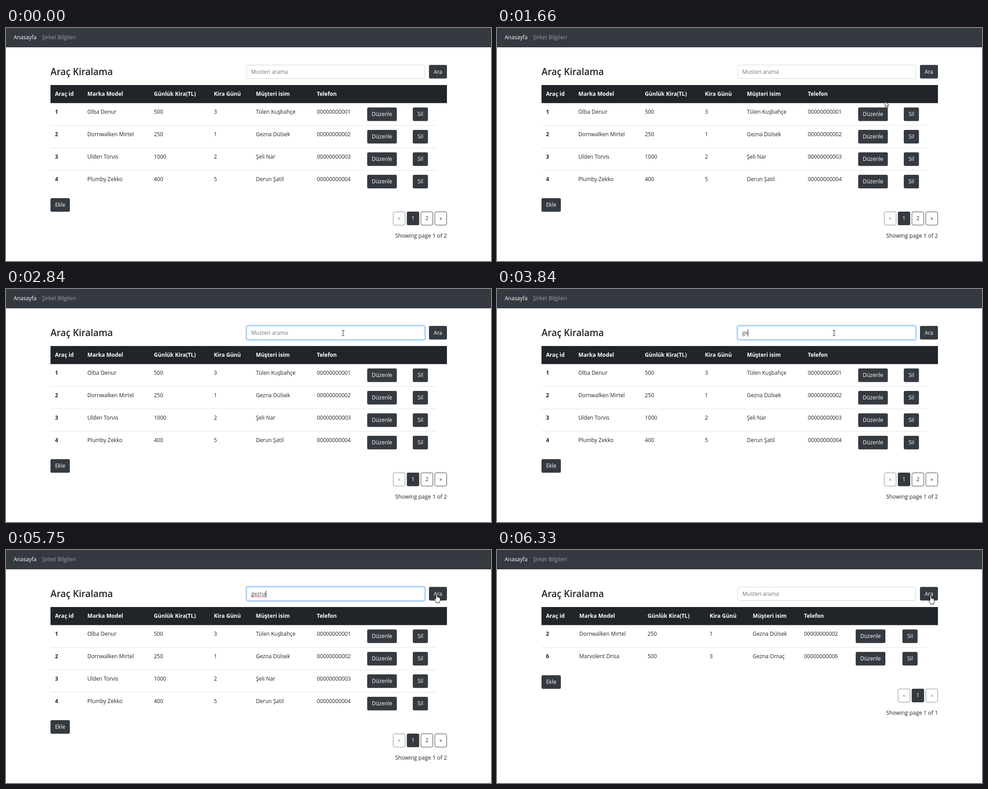
Animation of 1079x519 px, one loop 8 s. Source, as an HTML page:

```html
<!DOCTYPE html>
<html lang="tr">
<head>
<meta charset="utf-8">
<title>Araç Kiralama</title>
<style>
  html, body { margin: 0; width: 100%; height: 100%; overflow: hidden; background: #fff; }
  svg { display: block; font: 12px "Open Sans", "Noto Sans", sans-serif; fill: #212529; }
  .bold { font-weight: 700; font-size: 12.1px; }
  .title { font-weight: 600; font-size: 20.7px; }
  .white { fill: #fff; }
  .mid { text-anchor: middle; }
  .end { text-anchor: end; font-size: 12.35px; }
</style>
</head>
<body>
<svg id="stage" width="1079" height="519" viewBox="0 0 1079 519"></svg>
<script>
const LOOP = 8000, DARK = '#343a40';
const FOCUS = 2345, CLICK = 6050, RESULT = 6330, FADE = 150;
const QUERY = 'gezna', KEY_TIMES = [3460, 3840, 4160, 4420, 4620];
const HEADERS = ['Araç id', 'Marka Model', 'Günlük Kira(TL)', 'Kira Günü', 'Müşteri isim', 'Telefon'];

const allCars = {
  columns: [109, 181, 329, 462.5, 556, 691.5], edit: 803.5, remove: 905, pages: ['«', '1', '2', '»'],
  rows: [
    ['1', 'Olba Denur', '500', '3', 'Tülen Kuşbahçe', '00000000001'],
    ['2', 'Dornwalken Mirtel', '250', '1', 'Gezna Dülsek', '00000000002'],
    ['3', 'Ulden Torvis', '1000', '2', 'Şeli Nar', '00000000003'],
    ['4', 'Plumby Zekko', '400', '5', 'Derun Şatil', '00000000004'],
  ],
};
const foundCars = {
  columns: [109, 183, 335, 473, 569, 683], edit: 798, remove: 902, pages: ['«', '1', '»'],
  rows: [allCars.rows[1], ['6', 'Marvolent Drisa', '500', '3', 'Gezna Omaç', '00000000006']],
};

const text = (x, y, value, cls = '', attrs = '') => `<text x="${x}" y="${y}" class="${cls}" ${attrs}>${value}</text>`;
const box = (x, y, w, h, fill, attrs = '') => `<rect x="${x}" y="${y}" width="${w}" height="${h}" fill="${fill}" ${attrs}/>`;
const button = (x, y, w, label, id = '') =>
  box(x, y, w, 30.3, DARK, `rx="3" ${id}`) + text(x + w / 2, y + 19.3, label, 'white mid');

function pager(pages, y) {
  return pages.map((label, i) => {
    const x = 953.5 - (pages.length - 1 - i) * 30.85;
    if (label === '1') return button(x, y, 27.5, label);
    const disabled = label === '«' || (label === '»' && pages.length === 3);
    return `<g opacity="${disabled ? 0.6 : 1}">` +
      box(x + .5, y + .5, 26.5, 29.5, '#fff', `rx="3" stroke="${DARK}"`) +
      text(x + 13.75, y + 19.3, label, 'mid', `style="fill:${DARK}"`) + '</g>';
  }).join('');
}

function table(id, { columns, edit, remove, rows, pages }) {
  const footer = 179 + rows.length * 50;
  const head = columns.map((x, i) => text(x, 151.3, HEADERS[i], 'bold white')).join('');
  const body = rows.map((cells, r) => {
    const y = 167 + r * 50;
    return (r ? box(99, y - .5, 858, 1, '#dee2e6') : '') +
      cells.map((cell, i) => text(columns[i], y + 24.3, cell, i ? '' : 'bold')).join('') +
      button(edit, y + 10, 66, 'Düzenle') + button(remove, y + 10, 33.7, 'Sil');
  }).join('');
  return `<g id="${id}">${head}${body}${button(99, footer, 43, 'Ekle')}${pager(pages, footer + 30)}` +
    text(981, footer + 88, `Showing page 1 of ${pages.length - 2}`, 'end') + '</g>';
}

const stage = document.getElementById('stage');
stage.innerHTML =
  box(0, 0, 1079, 43, DARK) + text(17, 25.3, 'Anasayfa', 'white') +
  text(80, 25.3, 'Şirket Bilgileri', '', 'style="fill:#999da0"') +
  text(99, 104.8, 'Araç Kiralama', 'title') +
  box(533.75, 80.75, 399.5, 33.5, 'none', 'id="inputGlow" rx="5" stroke="#007bff" stroke-width="2.5"') +
  box(535.5, 82.5, 396, 30, '#fff', 'rx="3" stroke="#ced4da"') +
  box(535.5, 82.5, 396, 30, 'none', 'id="inputBorder" rx="3" stroke="#80bdff"') +
  text(545.5, 102.3, '', '', 'id="field"') +
  '<path id="squiggle" fill="none" stroke="#f00" stroke-width=".9"/>' +
  box(545, 90, 1, 16, '#333', 'id="caret"') +
  box(939.5, 81, 43, 33.3, 'none', 'id="buttonGlow" rx="5" stroke="#52585d" stroke-width="3"') +
  button(941, 82.3, 40, 'Ara', 'id="searchButton"') +
  box(99, 127, 882, 40.3, '#212529') +
  table('all', allCars) + table('found', foundCars) +
  `<g id="pointer" stroke-linejoin="round">
    <path id="arrow" d="M.5 .5V12.8L3.3 10.2L5.2 14.5L7.2 13.6L5.3 9.4H9Z" fill="#fff" stroke="#000" stroke-width=".9"/>
    <path id="beam" d="M-3 -6H-1Q0 -6 0 -5Q0 -6 1 -6H3M0 -5V5M-3 6H-1Q0 6 0 5Q0 6 1 6H3" fill="none" stroke="#222"/>
    <path id="hand" d="M-1.5 1Q0 -1 1.5 1V6Q3 5 4 6.5Q5.5 5.8 6.2 7.3Q8 7 8 9V13Q8 15 6.5 16.5V18.5H-1V16.5Q-3 14 -5 11Q-5.8 9 -4 9Q-3 9 -1.5 11Z" fill="#fff" stroke="#000"/>
  </g>`;

const ui = Object.fromEntries([...stage.querySelectorAll('[id]')].map(node => [node.id, node]));
const show = (node, visible) => node.style.display = visible ? '' : 'none';
const clamp = v => Math.max(0, Math.min(1, v));
const easeOut = p => 1 - (1 - p) ** 2;
const easeBoth = p => p * p * (3 - 2 * p);

// The pointer advances in discrete steps along quadratic curves.
const moves = [
  { start: 140, step: 53.3, steps: 3, ease: p => p, path: [[1060, 511], [1035, 500], [1080, 525]] },
  { start: 760, step: 54.4, steps: 9, ease: easeOut, path: [[1064, 507], [640, 230], [866, 171]] },
  { start: 1660, step: 61.5, steps: 9, ease: easeBoth, path: [[863, 163], [800, 120], [750, 98]] },
  { start: 5480, step: 57, steps: 4, ease: easeBoth, path: [[765, 98], [870, 96], [958, 99]] },
  { start: 5780, step: 57, steps: 3, ease: easeOut, path: [[959, 99], [963, 100], [965, 102]] },
];

function pointerAt(t) {
  const move = moves.filter(m => m.start <= t).pop();
  if (!move) return [1090, 530];
  const p = move.ease(Math.min(Math.floor((t - move.start) / move.step), move.steps) / move.steps);
  const [a, b, c] = move.path;
  return [0, 1].map(i => Math.round((1 - p) ** 2 * a[i] + 2 * p * (1 - p) * b[i] + p * p * c[i]));
}

function drawPointer(t) {
  const [x, y] = pointerAt(t);
  const overInput = y < 113 && x > 535 && x < 932;
  const overButton = y < 113 && x > 940 && x < 981;
  show(ui.pointer, !(t >= 300 && t < 760));
  ui.pointer.setAttribute('transform', `translate(${x} ${y})`);
  show(ui.beam, overInput);
  show(ui.hand, overButton);
  show(ui.arrow, !overInput && !overButton);
}

function drawSearch(t) {
  const done = t >= RESULT;
  const clicked = done ? 0 : easeBoth(clamp((t - CLICK) / FADE));
  const focus = done ? 0 : easeBoth(clamp((t - FOCUS) / FADE)) - clicked;
  const typed = done ? '' : QUERY.slice(0, KEY_TIMES.filter(k => k <= t).length);
  ui.field.textContent = typed || 'Musteri arama';
  ui.field.style.fill = typed ? '#495057' : '#6c757d';

  const width = typed ? ui.field.getComputedTextLength() : 0;
  const blinkOff = (t >= 2840 && t < 3360) || (t >= 5150 && t < 5650);
  show(ui.caret, t >= FOCUS && t < CLICK && !blinkOff);
  ui.caret.setAttribute('x', Math.round(545 + width));

  show(ui.squiggle, t >= 5650 && t < CLICK);
  const teeth = Math.round(width / 2);
  ui.squiggle.setAttribute('d', 'M546 105' + Array.from({ length: teeth }, (_, i) => `l2 ${i % 2 ? 2 : -2}`).join(''));

  ui.inputGlow.setAttribute('opacity', focus * .25);
  ui.inputBorder.setAttribute('opacity', focus);
  ui.buttonGlow.setAttribute('opacity', clicked * .5);
  ui.searchButton.setAttribute('fill', clicked > 0 ? '#1d2124' : DARK);
}

function draw(now) {
  const t = now % LOOP;
  show(ui.all, t < RESULT);
  show(ui.found, t >= RESULT);
  drawSearch(t);
  drawPointer(t);
}

const origin = performance.now();
function tick() {
  draw(performance.now() - origin);
  requestAnimationFrame(tick);
}
tick();
</script>
</body>
</html>
```
